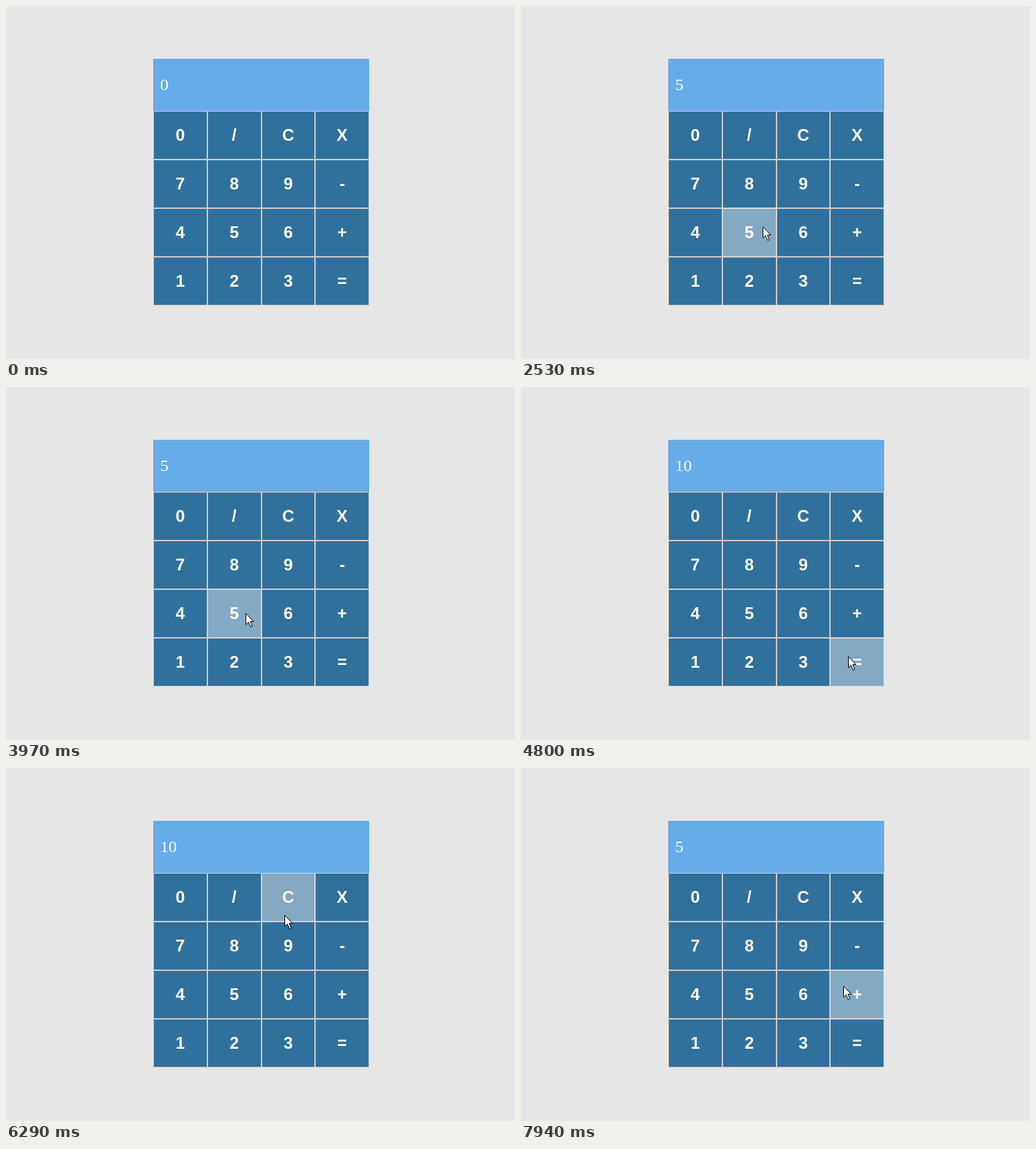
An HTML page that plays this animation: 733 px wide and 508 px high, repeating every 8000 ms.

```html
<!DOCTYPE html>
<html lang="en">
<head>
<meta charset="utf-8">
<title>Calculator</title>
<style>
  html, body { margin: 0; width: 100%; height: 100%; overflow: hidden; background: #e6e6e6; }
  #calculator { position: absolute; left: 212px; top: 76px; width: 311px; color: #fff; font-size: 24px; }
  #display { height: 75px; padding-left: 10px; line-height: 75px; background: #65ace9; font-family: "Liberation Serif", serif; }
  #keys { display: grid; grid-template-columns: repeat(4, 1fr); grid-auto-rows: 70px; }
  #keys div { box-sizing: border-box; border: 1px solid #ccc; background: #30709c; text-align: center;
    font: bold 24px/68px "Liberation Sans", sans-serif; }
  #keys .hover { background: #84a9c3; border-color: #d9d9d9; }
  #cursor { position: absolute; left: 0; top: 0; }
</style>
</head>
<body>
<div id="calculator">
  <div id="display">0</div>
  <div id="keys"></div>
</div>
<svg id="cursor" width="13" height="22">
  <path d="M.5 .8V17L4.3 13.4L7.2 20.3L9.6 19.3L6.8 12.5H11.5Z" fill="#fff" stroke="#000"/>
</svg>
<script>
const LOOP = 8000, STEP = 70;
const display = document.getElementById('display');
const keysBox = document.getElementById('keys');
const cursor = document.getElementById('cursor');

const keys = [...'0/CX789-456+123='].map(label => {
  const key = document.createElement('div');
  key.textContent = label;
  return keysBox.appendChild(key);
});

// Pointer strokes: start time, number of steps, way points
const strokes = [
  [70, 1, [[600, 374]]],
  [1230, 1, [[598, 374]]],
  [1630, 9, [[545, 352], [393, 306], [335, 311], [327, 318], [326, 321]]],
  [2400, 6, [[326, 321], [370, 314], [440, 306], [465, 304]]],
  [2930, 1, [[453, 316]]],
  [3080, 11, [[448, 318], [367, 320], [325, 322], [322, 323], [324, 323], [326, 322]]],
  [3970, 11, [[345, 325], [410, 350], [455, 378], [470, 386], [474, 388], [473, 387]]],
  [4800, 1, [[471, 387]]],
  [6010, 11, [[468, 372], [437, 285], [401, 211], [395, 196], [388, 235], [361, 307]]],
  [6850, 10, [[352, 318], [335, 340], [334, 342], [372, 338], [436, 322]]],
  [7670, 4, [[455, 297], [470, 284], [469, 300], [464, 313]]]
];
const readouts = [[0, '0'], [2400, '5'], [3080, '0'], [3500, '5'], [4600, '10'], [6430, '0'], [7130, '5']];

const latest = (list, t) => list.findLast(([start]) => start <= t);

// Catmull-Rom curve through the points, u from 0 to 1
function along(points, u) {
  const last = points.length - 1;
  const i = Math.min(Math.floor(u * last), Math.max(last - 1, 0));
  const f = u * last - i;
  const at = k => points[Math.max(0, Math.min(last, k))];
  return [0, 1].map(axis => {
    const [a, b, c, d] = [-1, 0, 1, 2].map(k => at(i + k)[axis]);
    return Math.round(b + f / 2 * (c - a + f * (2 * a - 5 * b + 4 * c - d + f * (3 * (b - c) + d - a))));
  });
}

function render(t) {
  display.textContent = latest(readouts, t)[1];
  const stroke = latest(strokes, t);
  cursor.style.visibility = stroke ? 'visible' : 'hidden';
  let hovered = -1;
  if (stroke) {
    const [start, steps, points] = stroke;
    const step = Math.min(steps - 1, Math.floor((t - start) / STEP));
    const [x, y] = along(points, steps > 1 ? step / (steps - 1) : 0);
    cursor.style.transform = `translate(${x}px, ${y}px)`;
    const column = Math.floor((x - 212) / 77.75), row = Math.floor((y - 151) / 70);
    if (column >= 0 && column < 4) hovered = row * 4 + column;
  }
  keys.forEach((key, i) => key.classList.toggle('hover', i === hovered));
}

function frame() {
  render(performance.now() % LOOP);
  requestAnimationFrame(frame);
}
frame();
</script>
</body>
</html>
```
